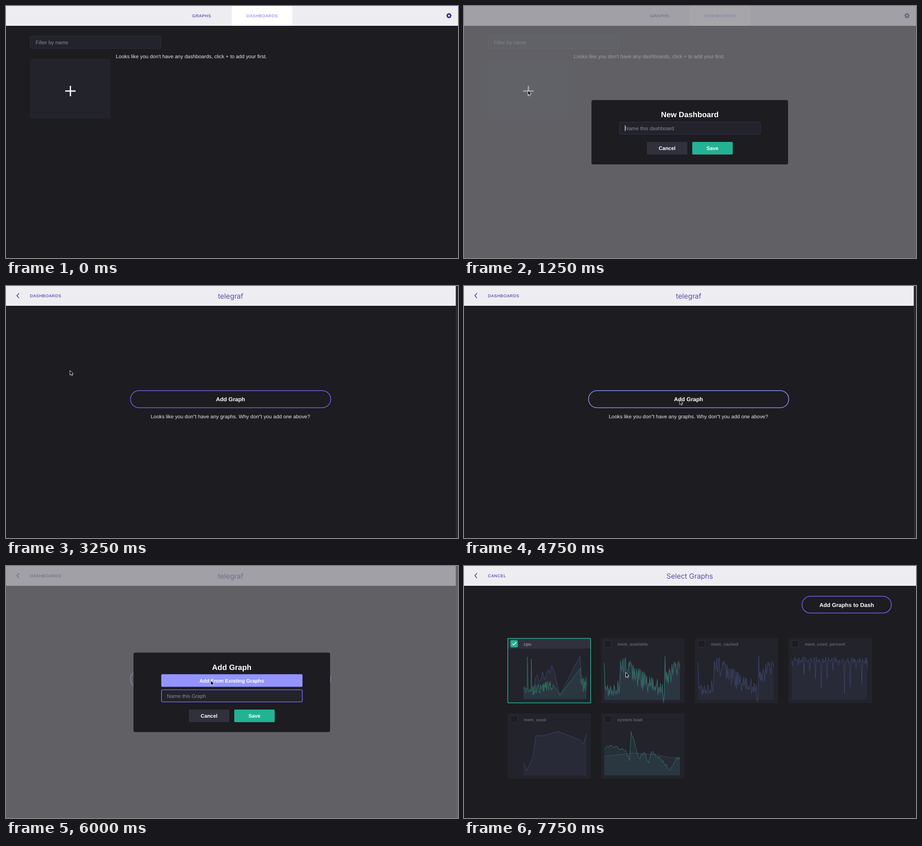
An HTML page with a canvas that plays this animation: 1000x560 px, repeating every 8 s.

```html
<!DOCTYPE html>
<html lang="en">
<head>
<meta charset="utf-8">
<title>Dashboards</title>
<style>
  html, body { margin: 0; width: 100%; height: 100%; overflow: hidden; background: #1c1c21; }
  canvas { display: block; }
</style>
</head>
<body>
<canvas id="stage" width="1000" height="560"></canvas>
<script>
const ctx = document.getElementById('stage').getContext('2d');
const LOOP = 8000, STEP = 250;
const INK = '#311f94', PURPLE = '#7a65f2', LILAC = '#9394ff', GREEN = '#22b394';
const BG = '#1c1c21', PANEL = '#22232b', LINE = '#333541', SLATE = '#31313d';
const SANS = '"Liberation Sans", Arial, sans-serif';

// Cursor path: step, x, y
const PATH = [
  [1, 300, 350], [3, 141.5, 187.5], [14, 141.5, 187.5], [16, 230, 382], [19, 477, 253],
  [24, 453, 254.5], [25, 452.5, 253.5], [29, 180, 444], [30, 175, 245], [31, 357.5, 236.5]
];

function lerpAt(points, x) {
  const i = Math.max(1, points.findIndex(p => p[0] >= x));
  const a = points[i - 1], b = points[i], k = (x - a[0]) / (b[0] - a[0]);
  return a.map((v, j) => v + (b[j] - v) * k);
}

function box(x, y, w, h, r, fill, stroke, width = 1) {
  ctx.beginPath();
  ctx.roundRect(x, y, w, h, r);
  if (fill) { ctx.fillStyle = fill; ctx.fill(); }
  if (stroke) { ctx.strokeStyle = stroke; ctx.lineWidth = width; ctx.stroke(); }
}

function text(str, x, y, size, color, { weight = 400, align = 'left', spacing = 0, font = SANS } = {}) {
  ctx.font = `${weight} ${size}px ${font}`;
  ctx.textRendering = 'geometricPrecision';
  ctx.letterSpacing = spacing + 'px';
  ctx.textAlign = align;
  ctx.fillStyle = color;
  ctx.fillText(str, x, y);
  return ctx.measureText(str).width;
}
const bold = (str, x, y, size, color = '#fff', align = 'center') =>
  text(str, x, y, size, color, { weight: 700, align });
const caps = (str, x, color = INK) => text(str, x, 24.5, 9, color, { spacing: 0.65 });

function polyline(points, color, width) {
  ctx.beginPath();
  points.forEach(p => ctx.lineTo(...p));
  ctx.strokeStyle = color;
  ctx.lineWidth = width;
  ctx.stroke();
}

function gear(x, y) {
  ctx.beginPath();
  for (let i = 0; i < 32; i++) {
    const r = i % 4 < 2 ? 6.2 : 4.6, a = (i - 0.5) * Math.PI / 16;
    ctx.lineTo(x + r * Math.cos(a), y + r * Math.sin(a));
  }
  ctx.closePath();
  ctx.moveTo(x + 2.2, y);
  ctx.arc(x, y, 2.2, 0, 7);
  ctx.fillStyle = INK;
  ctx.fill('evenodd');
}

function header(width, back, title) {
  box(0, 0, width, 44, 0, '#ededf2');
  if (!back) return;
  polyline([[29, 16], [23.8, 21.5], [29, 27]], INK, 1.2);
  caps(back, 53);
  text(title, width / 2 - 0.5, 27.5, 15.6, INK, { weight: 300, align: 'center', font: 'Inter, sans-serif', spacing: 0.1 });
}

function dashboardList() {
  header(1000);
  box(499.5, 0, 134, 44, 0, '#fff');
  caps('GRAPHS', 412);
  caps('DASHBOARDS', 532, PURPLE);
  gear(980, 21.5);
  box(53.5, 67, 289.5, 27, 3, PANEL, LINE);
  text('Filter by name', 65.5, 84.5, 11.4, '#898a99');
  box(53, 117, 178.5, 133.5, 3, PANEL);
  box(131, 187.5, 23, 3, 0, '#f6f6f8');
  box(141, 177.5, 3, 23, 0, '#f6f6f8');
  text("Looks like you don't have any dashboards, click + to add your first.", 243, 116, 11.38, '#e7e8eb');
}

function emptyDashboard(hover) {
  header(995, 'DASHBOARDS', 'telegraf');
  box(995, 0, 5, 560, 0, '#2a2a34');
  box(275.5, 232.5, 443, 38, 19, null, hover ? LILAC : PURPLE, 1.5);
  bold('Add Graph', 496.7, 256.3, 12.5);
  text('Looks like you don"t have any graphs. Why don"t you add one above?', 496.5, 294, 11.35, '#e7e8eb', { align: 'center' });
}

function modal(opacity, title, top, bottom, placeholder, value, focus, caret, extra) {
  ctx.globalAlpha = opacity;
  box(0, 0, 1000, 560, 0, 'rgba(126,127,132,.69)');
  box(282, top, 435, bottom - top, 4, BG);
  bold(title, 499.5, top + 38.3, 16.9);
  if (extra) {
    box(343.5, top + 48, 312.5, 28, 2, LILAC);
    bold(extra, 499.5, top + 66.3, 11.3);
  }
  const y = bottom - 94;
  box(344, y, 311.5, 27, 3, PANEL, focus ? PURPLE : '#2e2d45', 1.6);
  const width = text(value || placeholder, 356, y + 17.6, 11.45, value ? '#f6f6f8' : '#898a99');
  if (caret) box(356 + (value ? width : 0), y + 7, 1, 13, 0, '#fff');
  box(404.5, bottom - 50, 89.5, 28, 2, SLATE);
  box(505, bottom - 50, 89.5, 28, 2, GREEN);
  bold('Cancel', 449.3, bottom - 32, 11.3);
  bold('Save', 549.7, bottom - 32, 11.3);
  ctx.globalAlpha = 1;
}

const random = seed => () => (seed = seed * 16807 % 2147483647) / 2147483647;

// Keeps the key points and fills the gaps between them with seeded jitter
function jagged(keys, amp, gap, seed) {
  const rand = random(seed * 7919), out = [];
  keys.forEach((p, i) => {
    out.push(p);
    const next = keys[i + 1];
    if (!next) return;
    for (let x = p[0] + gap; x < next[0] - gap / 2; x += gap) {
      out.push([x, lerpAt([p, next], x)[1] + (rand() * 2 - 1) * amp]);
    }
  });
  return out;
}

const shift = (points, dx, dy) => points.map(([x, y]) => [x + dx, y + dy]);

// All series are relative to their card
const memory = jagged([[7, 54], [9, 112], [41, 104], [43, 50], [60, 70], [140, 122], [141.3, 40], [143, 88], [174.5, 64]], 22, 1.4, 7);
const cpuUser = [
  ...jagged([[35.5, 113], [59, 118]], 3, 4, 2),
  ...jagged([[62, 88], [103, 72]], 16, 4, 6),
  [116, 127], [160.5, 40], [163, 80], [175, 105]
];
const cpuBusy = [
  ...jagged([[35.5, 112], [43, 116]], 8, 0.9, 5), [44.3, 42],
  ...jagged([[46, 116], [52, 116]], 6, 0.9, 9), [53, 46],
  ...jagged([[54.5, 116], [102, 104]], 12, 0.9, 3),
  [116, 127], [162, 67],
  ...jagged([[163, 100], [175, 106]], 20, 0.9, 4)
];
const depth = random(31);
const usedPercent = jagged([[7, 48], [174.5, 50]], 7, 1.6, 23)
  .map(([x, y], i) => [x, i % 8 === 1 ? y + 15 + 55 * depth() : y]);
const used = [[35.5, 110], [42.5, 127], [50, 112], [56.5, 95], [63, 49], [77, 50], [112, 40], [161, 59], [168, 69], [175, 45]];
const loadNow = jagged([[7, 80], [19, 71], [54, 82], [63, 105], [66.5, 40], [84, 99], [95, 86], [105, 110], [111, 85],
  [131, 100], [153, 127], [165, 102], [174.5, 99]], 4, 2, 8);
const loadLong = [[7, 95], [72, 88], [117, 91], [152, 98], [174.5, 98]];

const CARDS = [
  { name: 'cpu', blue: cpuUser, green: cpuBusy, base: 135.5 },
  { name: 'mem_available', blue: shift(memory, 0, 4), green: memory },
  { name: 'mem_cached', blue: memory },
  { name: 'mem_used_percent', blue: usedPercent },
  { name: 'mem_used', blue: used },
  { name: 'system load', blue: loadLong, green: loadNow }
];

function area(points, base, fill, stroke) {
  polyline(points, stroke, 0.8);
  ctx.lineTo(points[points.length - 1][0], base);
  ctx.lineTo(points[0][0], base);
  ctx.fillStyle = fill;
  ctx.fill();
}

function card({ name, blue, green, base = 137.7 }, i, picked) {
  const x = 96 + i % 4 * 207.3, y = 160 + Math.floor(i / 4) * 167.6;
  box(x, y, 185, 144.8, 2, PANEL);
  if (picked) {
    box(x, y, 185, 23.5, 2, SLATE);
    box(x + 0.75, y + 0.75, 183.5, 143.5, 2, null, GREEN, 1.5);
  }
  box(x + 7.2, y + 5.2, 15.4, 15, 2, picked ? GREEN : BG, picked ? GREEN : LINE);
  if (picked) polyline([[x + 10.8, y + 12.8], [x + 13.7, y + 15.5], [x + 19.6, y + 9.6]], '#fff', 1.5);
  bold(name, x + 36, y + 17.2, 9.5, picked ? '#8e8f9e' : '#5f606d', 'left');
  area(shift(blue, x, y), y + base, 'rgba(85,95,145,.12)', '#454e78');
  if (green) area(shift(green, x, y), y + base, 'rgba(60,150,130,.12)', '#348266');
}

function selectGraphs(picked) {
  header(1000, 'CANCEL', 'Select Graphs');
  box(747.8, 67.3, 197.6, 37.3, 18.6, null, picked ? PURPLE : '#5c5190', 1.5);
  bold('Add Graphs to Dash', 846.6, 90.8, 12.5, picked ? '#fff' : '#63588f');
  CARDS.forEach((c, i) => card(c, i, picked && i === 0));
}

function cursor(step) {
  const [, x, y] = lerpAt(PATH, step);
  const shape = [[0, 0], [0, 10.6], [2.5, 8.4], [4.2, 12], [6, 11.2], [4.4, 7.7], [7.6, 7.5]];
  ctx.beginPath();
  shift(shape, x, y).forEach(p => ctx.lineTo(...p));
  ctx.closePath();
  ctx.fillStyle = '#000';
  ctx.fill();
  ctx.strokeStyle = '#fff';
  ctx.lineWidth = 0.9;
  ctx.stroke();
}

function draw(time) {
  const step = Math.floor(time % LOOP / STEP);
  box(0, 0, 1000, 560, 0, BG);
  if (step < 13) {
    dashboardList();
    const typed = 'telegraf'.slice(0, Math.max(0, Math.floor((step - 6) * 1.6)));
    if (step >= 4) modal(step === 4 ? 0.5 : 1, 'New Dashboard', 209, 352, 'Name this dashboard', typed, step > 5, true);
  } else if (step < 25) {
    emptyDashboard(step >= 18);
    if (step >= 20) modal(step === 20 ? 0.5 : 1, 'Add Graph', 192.5, 369, 'Name this Graph', '', step > 20, false, 'Add From Existing Graphs');
  } else {
    selectGraphs(step >= 30);
  }
  if (step) cursor(step);
}

const start = performance.now();
(function tick() {
  draw(performance.now() - start);
  requestAnimationFrame(tick);
})();
</script>
</body>
</html>
```
